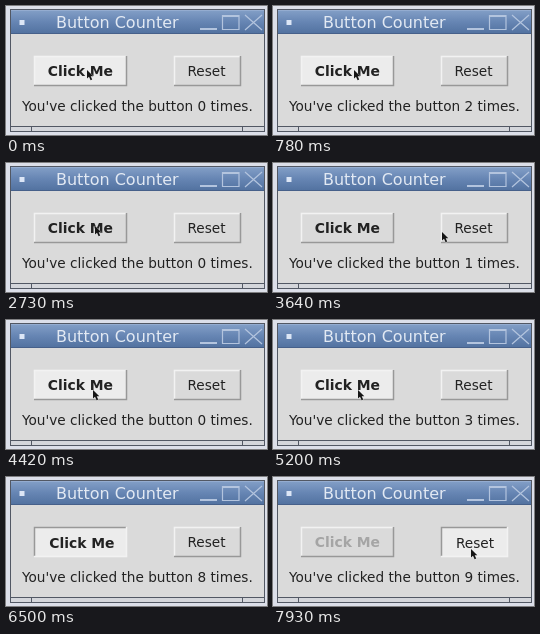
An HTML page that plays this animation: 261x129 px, repeating every 8 s.

```html
<!DOCTYPE html>
<html lang="en">
<head>
<meta charset="utf-8">
<title>Button Counter</title>
<style>
  html, body { margin: 0; width: 100%; height: 100%; overflow: hidden; background: #dcdfe9; }
  svg { display: block; width: 261px; height: 129px; }
  text { font: 13.65px "DejaVu Sans", sans-serif; fill: #222; white-space: pre; }
  .title { font-size: 16px; fill: #e2e9f3; }
  .bold { font-size: 13.9px; font-weight: bold; }
  .icons { fill: none; stroke: #b3c4de; stroke-width: 1.2; }
  .face { fill: #dadada; }
  .lit { stroke: #f2f2f2; }
  .dark { stroke: #989898; }
  .lit, .dark { fill: none; stroke-width: 1.5; }
  .hover .face { fill: #ececec; }
  .down .lit { stroke: #989898; }
  .down .dark { stroke: #f2f2f2; }
  .down text { transform: translate(1.5px, 1.5px); }
  .off text { fill: #a5a5a5; }
</style>
</head>
<body>
<svg viewBox="0 0 261 129">
  <defs>
    <linearGradient id="bar" x2="0" y2="1">
      <stop offset="0" stop-color="#839fc7"/>
      <stop offset=".5" stop-color="#6685b3"/>
      <stop offset="1" stop-color="#51719f"/>
    </linearGradient>
  </defs>

  <rect x="4" y="3" width="255" height="123" fill="#525864"/>
  <rect x="5" y="4" width="253" height="24" fill="url(#bar)"/>
  <path d="M5 4.5H258" stroke="#94acd0"/>
  <path d="M5 27.5H258" stroke="#46608a"/>
  <rect x="5" y="28" width="253" height="92" fill="#dadada"/>
  <rect x="5" y="121" width="253" height="4" fill="#d4d6db"/>
  <path d="M25.5 121V125M236.5 121V125" stroke="#525864"/>

  <rect x="13.5" y="14" width="5" height="5" fill="#dce6f6"/>
  <text class="title" x="50" y="22">Button Counter</text>
  <g class="icons">
    <path d="M194 23H211" stroke-width="2"/>
    <path d="M216.5 9.5H233V23.5H216.5ZM216.5 10.5H233"/>
    <path d="M239 9L256 24M256 9L239 24"/>
  </g>

  <g id="click">
    <rect class="face" x="28" y="50" width="93" height="30"/>
    <path class="lit" d="M28.5 79V50.5H120"/>
    <path class="dark" d="M28 79.5H120.5V50"/>
    <text class="bold" x="41.7" y="69.5">Click Me</text>
  </g>
  <g id="reset">
    <rect class="face" x="168" y="50" width="67" height="30"/>
    <path class="lit" d="M168.5 79V50.5H234"/>
    <path class="dark" d="M168 79.5H234.5V50"/>
    <text x="181.5" y="69.5">Reset</text>
  </g>
  <text id="status" x="16" y="105"></text>
  <path id="cursor" d="M0 0V8.6L2 6.8L3.6 10.2L5.2 9.5L3.7 6.2H6.3Z"
        fill="#151515" stroke="#f0f0f0" stroke-width=".7" paint-order="stroke"/>
</svg>
<script>
  const LOOP = 8000, TICK = 130, LIMIT = 9;
  const $ = id => document.getElementById(id);
  const ui = { click: $('click'), reset: $('reset'), status: $('status'), cursor: $('cursor') };

  // Each event is [tick, action, x, y]; a release counts, or clears over Reset.
  const events = [];
  const move = (tick, x, y) => events.push([tick, 'move', x, y]);
  const tap = (...ticks) => ticks.forEach((t, i) => events.push([t, i % 2 ? 'up' : 'down']));
  const resetTrip = t => {
    move(t, 122, 66);
    move(t + 1, 169, 69);
    move(t + 2, 196, 71);
    tap(t + 3, t + 4);
    move(t + 5, 139, 68);
  };

  move(0, 81, 64);
  tap(3, 4, 5, 6, 9, 10, 11, 12, 13, 14);
  resetTrip(15);
  move(21, 89, 63);
  tap(22, 23);
  move(26, 122, 66);
  resetTrip(27);
  move(33, 90, 69);
  move(34, 87, 70);
  move(35, 85, 70);
  tap(35, 36, 37, 38, 39, 40, 41, 42, 43, 44, 45, 46, 47, 48, 48.5, 49, 50, 51);
  events.push([50, 'hide']);
  move(51, 85, 70);
  move(53, 88, 70);
  move(57, 125, 71);
  move(58, 172, 72);
  move(59, 198, 72);
  tap(61);
  events.sort((a, b) => a[0] - b[0]);

  function stateAt(ms) {
    const s = { count: 0, down: false, shown: true, x: 0, y: 0 };
    for (const [tick, action, x, y] of events) {
      if (tick * TICK > ms + 0.01) break;
      if (action === 'move') Object.assign(s, { x, y, shown: true });
      else if (action === 'hide') s.shown = false;
      else {
        s.down = action === 'down';
        if (!s.down) s.count = s.x > 150 ? 0 : s.count + 1;
      }
    }
    return s;
  }

  function paint(button, hover, down, off) {
    button.classList.toggle('hover', hover && !off);
    button.classList.toggle('down', hover && down && !off);
    button.classList.toggle('off', off);
  }

  function draw(now) {
    const ms = now % LOOP;
    const s = stateAt(ms);
    // Hover highlights trail the pointer by one tick.
    const hoverX = stateAt(Math.max(0, ms - TICK)).x;
    paint(ui.click, hoverX < 121, s.down, s.count >= LIMIT);
    paint(ui.reset, hoverX >= 168 && hoverX < 235, s.down, false);
    ui.status.textContent = `You've clicked the button ${s.count} times.`;
    ui.cursor.setAttribute('transform', `translate(${s.x} ${s.y})`);
    ui.cursor.setAttribute('visibility', s.shown ? 'visible' : 'hidden');
  }

  const start = performance.now();
  function frame() {
    draw(performance.now() - start);
    requestAnimationFrame(frame);
  }
  frame();
</script>
</body>
</html>
```
